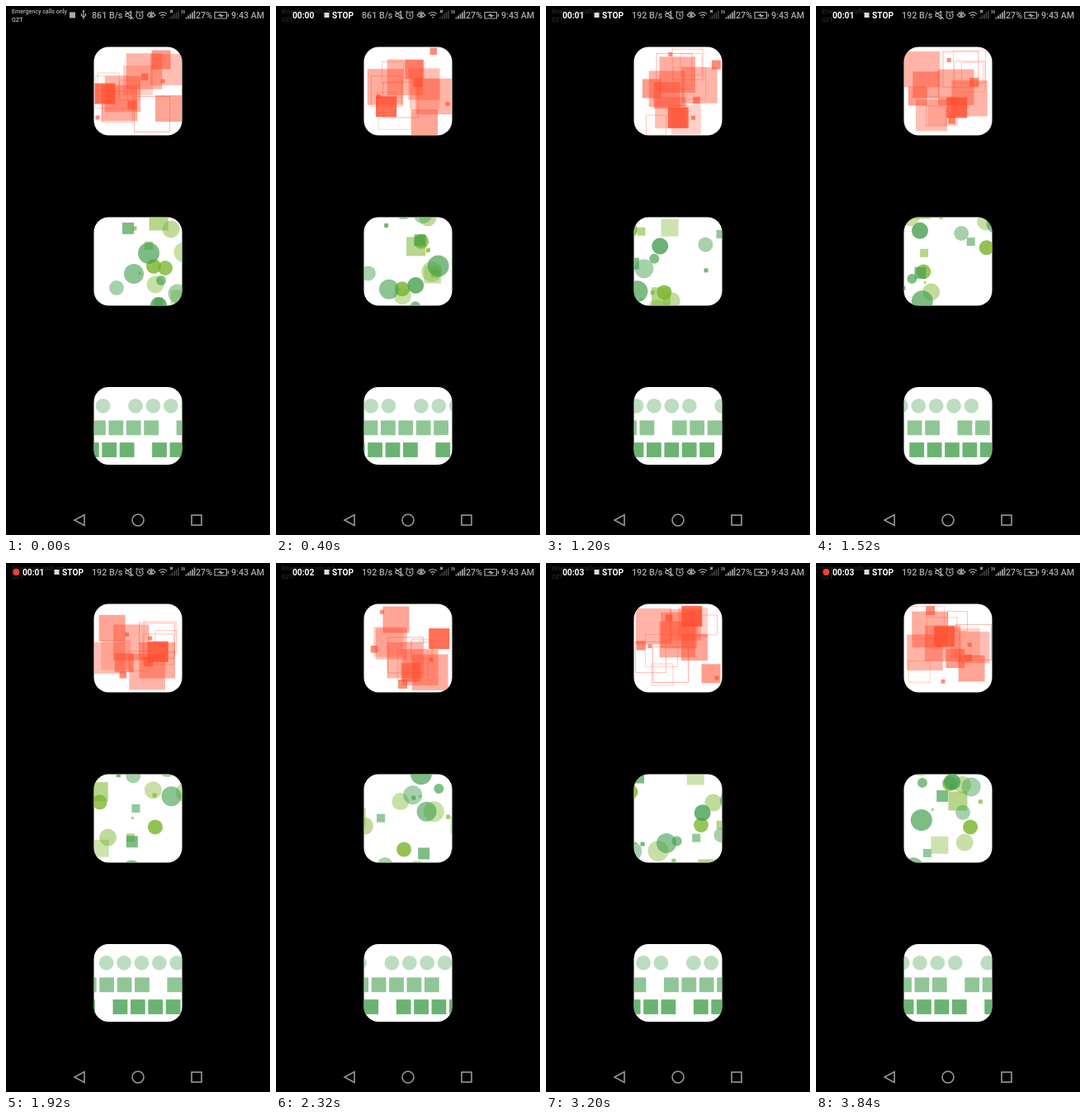
Write an HTML page with a canvas that moves like this. It is 320 px wide and 640 px high and loops after 3.92 s.

```html
<!DOCTYPE html>
<html lang="en">
<head>
<meta charset="utf-8">
<title>Animated cards</title>
<style>
html, body { margin: 0; width: 100%; height: 100%; overflow: hidden; background: #000; }
canvas, svg { position: absolute; left: 0; top: 0; }
text { font: 500 10.7px Roboto, sans-serif; fill: #aaa; }
.carrier { font-size: 7.1px; fill: #b0b0b0; }
.rec text { font-weight: 700; font-size: 10.2px; fill: #fff; }
.tiny { font-size: 4.5px; font-weight: 700; }
.line { fill: none; stroke: #aaa; stroke-width: 1.2; }
.nav { fill: none; stroke: #999; stroke-width: 1.6; }
</style>
</head>
<body>
<canvas id="stage" width="320" height="640"></canvas>
<svg width="320" height="640" viewBox="0 0 320 640">
  <text class="carrier" x="7" y="9">Emergency calls only</text>
  <text class="carrier" x="7" y="19">QZT</text>
  <g id="idle">
    <rect x="77" y="7.500" width="7" height="7" fill="#aaa"/>
    <path class="line" d="M94 6v10M91.500 9v2.500l2.500 2 2.500-2V9M93 7l1-1.500 1 1.500"/>
  </g>
  <g class="rec" id="rec">
    <rect x="5" y="2" width="93" height="19" fill="#000" opacity=".78"/>
    <circle id="dot" cx="12.300" cy="11" r="4" fill="#f4402c"/>
    <text id="clock" x="20" y="15">00:00</text>
    <rect x="58.500" y="8" width="6" height="6" fill="#ddd"/>
    <text x="68" y="15">STOP</text>
  </g>
  <text id="rate" x="104" y="15">861 B/s</text>
  <path class="line" d="M145 9.500h2.500l4-3v9l-4-3H145zM144.500 6.500l10 9"/>
  <circle class="line" cx="162" cy="11.500" r="4"/>
  <path class="line" d="M162 9v3h2M157.500 8l2-2M166.500 8l-2-2"/>
  <path class="line" d="M171 11q5-5 10 0-5 5-10 0M173 7l1 1.500M176 6v2M179 7l-1 1.500"/>
  <circle cx="176" cy="11" r="1.700" fill="#aaa"/>
  <path class="line" d="M185 9.500q5-4 10 0M187 11.800q3-2.500 6 0M189 14.200q1-1 2 0"/>
  <path class="line" d="M199 5l3 3M202 5l-3 3"/>
  <path d="M199 15.500v-2M201.500 15.500v-4M204 15.500v-6M206.500 15.500v-8M209 15.500v-10" stroke="#444" stroke-width="1.500"/>
  <text class="tiny" x="212" y="9">36</text>
  <path d="M218.500 15.500v-2M221 15.500v-4M223.500 15.500v-6M226 15.500v-8M228.500 15.500v-10" stroke="#aaa" stroke-width="1.600"/>
  <text x="230" y="15">27%</text>
  <path class="line" d="M253 7.500h14.500v7.500H253zM269.500 9.500v3.500"/>
  <path d="M256 11.500l5-2.500v2h4l-5 3v-2z" fill="#aaa"/>
  <text x="273" y="15">9:43 AM</text>
  <path class="nav" d="M95 615.500v13L83 622z"/>
  <circle class="nav" cx="160" cy="622" r="7"/>
  <rect class="nav" x="225" y="616" width="12" height="12"/>
</svg>
<script>
const LOOP = 3920, STEP = 80, LEFT = 106.5, WIDTH = 107;
const RED = '#ff4d2e', GREEN = '#46a150', LIME = '#7cb52e';
const byId = id => document.getElementById(id);
const ctx = byId('stage').getContext('2d');

// size, x, y, x speed, y speed, opacity
const redSquares = [
  [38, 194, 77, -2.8, 3.4, .36],
  [36, 160, 90, 4, 3.1, .25],
  [43.5, 167.5, 79, 4.55, 5.9, .42],
  [43.5, 137.5, 117.5, -2.63, -3.8, .46],
  [43.5, 141.5, 106.5, 2.9, -3.92, .42],
  [32, 197, 124, -3.3, 3.2, .5],
  [23, 188, 65, -3.9, 2.28, .55],
  [25, 120, 106, 2.63, 3.06, .8],
  [11, 153, 120, 3.7, -5.3, .65],
  [8.5, 168, 86, 4.45, -6.05, .65],
  [5, 190, 91, 3.5, 5.34, .65],
  [5, 111, 135, 2.6, -5, .65]
];
const redOutlines = [
  [43, 177, 131, -5, -3.4, .5],
  [37, 135, 122, -3.7, -3.7, .4],
  [24, 149.5, 102, -3, 2.8, .4],
  [39, 128, 104, 3, 5, .3],
  [26, 124, 94, 3.4, -2.6, .35]
];
const greenCircles = [
  [24, 155, 324, -3.5, 3.65, .62],
  [23, 208, 348, -5.83, 6.52, .48],
  [26, 173, 299, 4.6, 3.02, .7],
  [18, 134, 341, -4.29, -3.42, .48],
  [20, 185, 362, -3.06, -4.67, .8],
  [12, 188, 332, -3.71, 6.06, .68]
];
const limeCircles = [
  [25, 216, 298, -5.3, 4.56, .42],
  [21, 181, 337, -5.35, 2.69, .42],
  [21, 200, 270, -3.13, -2.7, .48],
  [18, 193, 317, -3.25, -6.25, .78],
  [18, 179, 315, -5.04, 5.3, .82]
];
const limeSquares = [
  [23, 185, 260, -2.98, 6, .55],
  [21, 210, 354, -3.92, -5.6, .38],
  [10, 173, 290, 3.89, 6.52, .55],
  [5, 156, 269, 5.57, 5.08, .7],
  [3, 162, 323, 4.15, -5.1, .6]
];
const greenSquares = [
  [14, 148, 269, 5.15, 2.79, .7],
  [10, 185, 358, -5.92, 2.29, .58],
  [5, 103, 238, 5.95, 5.35, .75]
];

const mod = (a, n) => ((a % n) + n) % n;
function bounce(pos, start, size) {
  const span = WIDTH - size, low = start + size / 2;
  const u = mod(pos - low, 2 * span);
  return low + Math.min(u, 2 * span - u);
}
function wrap(pos, start, size) {
  const low = start - size / 2;
  return low + mod(pos - low, WIDTH + size);
}

const pace = [[0, 0], [800, 10.3], [1520, 19.3], [2320, 29.55], [2880, 36.2], [3200, 40], [3920, 49]];
function progress(t) {
  const i = pace.findIndex(p => p[0] > t);
  const [t0, p0] = pace[i - 1], [t1, p1] = pace[i];
  return p0 + (p1 - p0) * (t - t0) / (t1 - t0);
}

function square(x, y, s) { ctx.fillRect(x - s / 2, y - s / 2, s, s); }
function outline(x, y, s) { ctx.strokeRect(x - s / 2, y - s / 2, s, s); }
function circle(x, y, s) {
  ctx.beginPath();
  ctx.arc(x, y, s / 2, 0, 7);
  ctx.fill();
}

function card(top, height, paint) {
  ctx.save();
  ctx.beginPath();
  ctx.roundRect(LEFT, top, WIDTH, height, 18);
  ctx.fillStyle = '#fff';
  ctx.fill();
  ctx.clip();
  paint(top);
  ctx.restore();
}
function particles(list, color, draw, move, top, p) {
  ctx.fillStyle = ctx.strokeStyle = color;
  for (const [size, x, y, vx, vy, alpha] of list) {
    ctx.globalAlpha = alpha;
    draw(move(x + vx * p, LEFT, size), move(y + vy * p, top, size), size);
  }
}
function row(draw, x, y, speed, alpha, p) {
  ctx.fillStyle = GREEN;
  ctx.globalAlpha = alpha;
  for (let i = 0; i < 5; i++) draw(wrap(x + i * WIDTH / 5 + speed * p, LEFT, 18), y, 17.8);
}

function render(t) {
  const p = progress(t);
  ctx.clearRect(0, 0, 320, 640);
  ctx.lineWidth = .8;
  card(49.5, 107, top => {
    particles(redOutlines, RED, outline, bounce, top, p);
    particles(redSquares, RED, square, bounce, top, p);
  });
  card(255.5, 107, top => {
    particles(limeSquares, LIME, square, wrap, top, p);
    particles(limeCircles, LIME, circle, wrap, top, p);
    particles(greenCircles, GREEN, circle, wrap, top, p);
    particles(greenSquares, GREEN, square, wrap, top, p);
  });
  card(461, 94, () => {
    row(circle, 157, 483.8, 3.67, .36, p);
    row(square, 215.5, 510.3, 4.66, .6, p);
    row(square, 186, 537, 3.17, .8, p);
  });

  const recording = t >= 80, elapsed = Math.max(0, t - 40);
  byId('idle').style.display = recording ? 'none' : '';
  byId('rec').style.display = recording ? '' : 'none';
  byId('dot').style.display = elapsed % 1000 >= 500 ? '' : 'none';
  byId('clock').textContent = '00:0' + Math.floor(elapsed / 1000);
  byId('rate').textContent = (t < 1040 ? 861 : 192) + ' B/s';
}

function tick() {
  const t = performance.now() % LOOP;
  render(Math.floor(t / STEP) * STEP);
  requestAnimationFrame(tick);
}
tick();
</script>
</body>
</html>
```
